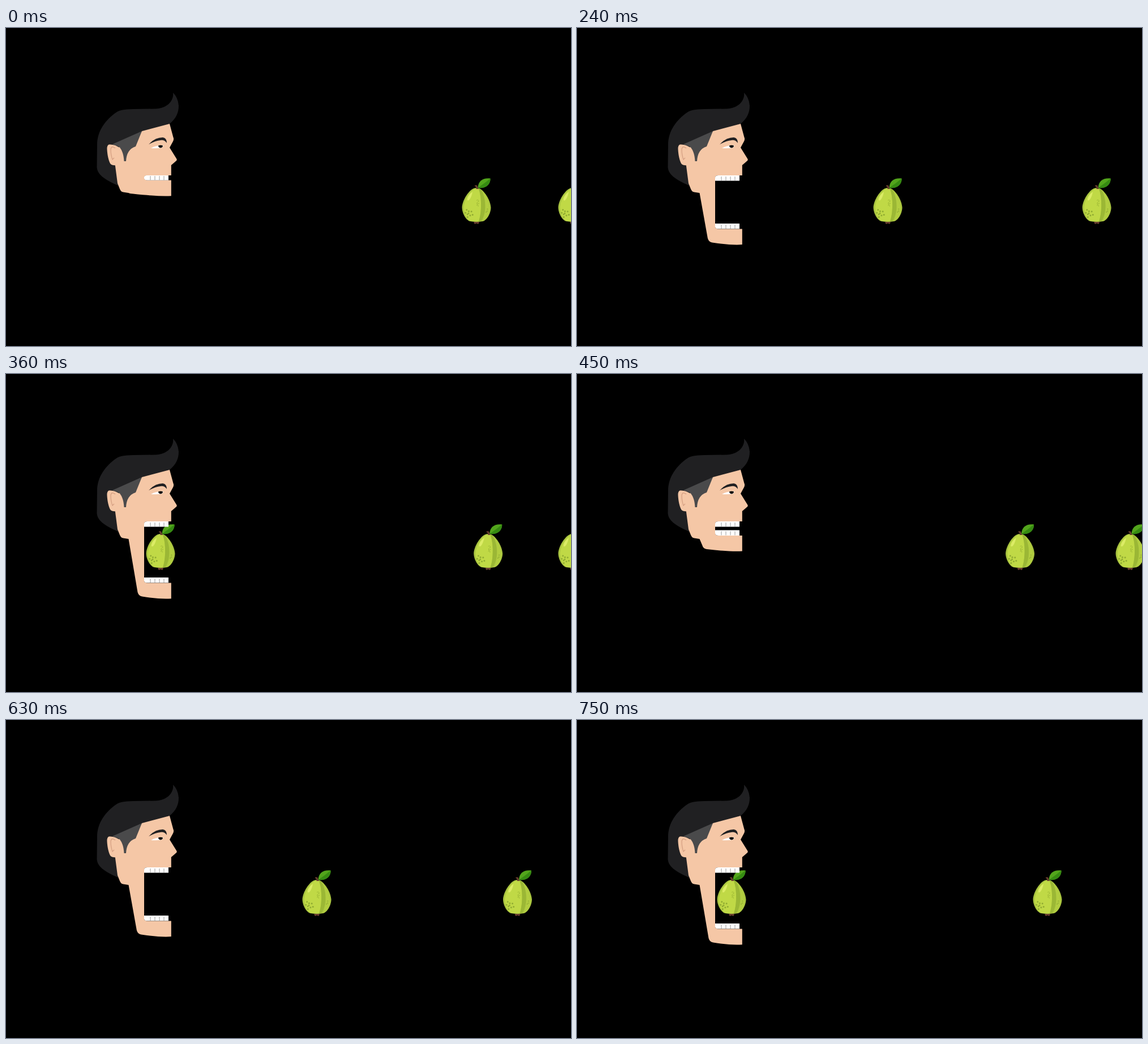
An HTML page for the animation above (0.78 s loop, 998 by 561 pixels).

```html
<!DOCTYPE html>
<html lang="en">
<head>
<meta charset="utf-8">
<title>Fruit eater</title>
<style>
  html, body { margin: 0; width: 100%; height: 100%; overflow: hidden; background: #000; }
  svg { display: block; width: 100vw; height: 100vh; }
</style>
</head>
<body>
<svg viewBox="0 0 998 561">
  <defs>
    <clipPath id="mouthClip"><path class="mouth"/></clipPath>
    <g id="fruit">
      <path fill="#6b4030" d="M-5 343L-3 346L0 344.5L3 346L5 343L3 341H-3Z"/>
      <path fill="#a9c440" d="M-5 283C-13 286 -25 303 -25.500 317C-25 329 -17 340 -11 341Q0 343 11 341C17 340 25 329 25.500 317C25 303 13 286 5 283Q0 281 -5 283Z"/>
      <path fill="#c0d946" d="M-4 284C-12 289 -22 303 -22.500 317C-22 329 -16 340 -9 341H4C9 328 10 300 4 284Q0 282 -4 284Z"/>
      <path fill="#9bb735" d="M4 284C10 300 9 328 4 341H8C18 327 18 300 7 284Z"/>
      <path fill="#b2cd40" d="M9 286C18 301 18 327 10 341C19 338 23 328 23 318C22 303 15 291 9 286Z"/>
      <path fill="#dcec66" d="M-7 289C-13 293 -17 300 -16 304C-13 306 -9 299 -7 289Z"/>
      <path fill="none" stroke="#9fb936" d="M0 304Q4 302 4 306Q0 307 1 311L5 309M0 313Q4 311 3 315"/>
      <g id="dots" fill="#91ac32"></g>
      <path fill="#6b4030" d="M-3 277.500L1 277.500Q2 281 4 284H-1Q1 281 -3 279Z"/>
      <path fill="#53a51c" d="M2.500 282C3 270 11 264 24.500 265.500C25 276 16 284 2.500 282Z"/>
      <path fill="#368b12" d="M2.500 282Q13 275 24.500 265.500C25 276 16 284 2.500 282Z"/>
    </g>
    <g id="teeth">
      <path fill="#fff" d="M244 0H287V9.500H244Z"/>
      <path stroke="#999" d="M255 2V9M263 2V9M271 2V9M279 2V9"/>
    </g>
  </defs>
  <rect width="998" height="561"/>

  <path fill="#202022" d="M295 114C297 128 285 142 264 142.500L226 143C208 143.500 201 145 196 148C174 163 162 182 161 204L160.500 246C162 258 171 266 198 278L240 200L289 169C301 159 305 149 305 137Q304 123 295 114Z"/>
  <path id="skin" fill="#f5c7a6"/>
  <path fill="#4a4a4b" d="M188 205L240 182L229 209Q213 214 212 235H208.500C208 222 204 213 199 209Z"/>
  <path fill="#f5c7a6" d="M202 212C195 207 189 205 182 205.500Q178 207 178.500 214C179 224 181 233 184 239Q187 243 195 242Z"/>
  <path fill="none" stroke="#d6a184" stroke-width="1.300" d="M193 212Q186 207 185 214Q185 224 188 232L191 229"/>
  <path fill="#202022" d="M252 205.500Q263 193 277 193Q284 194 284 203Q280 197 273 198Q263 199 252 205.500Z"/>
  <path fill="#fff" d="M256 212Q266 206.500 278 207L276 211Q267 213 256 212Z"/>
  <path d="M269 207.500Q273 206 277 207.500Q277 211 273 211.500Q269 211 269 207.500Z"/>

  <path class="mouth"/>
  <g id="fruits"></g>
  <g clip-path="url(#mouthClip)">
    <use href="#teeth" y="260"/>
    <use href="#teeth" id="lowerTeeth"/>
  </g>
</svg>
<script>
const STEP = 30, BITE = 13, LIFE = 2 * BITE - 1;
const launches = [-BITE, 0, BITE - 1];

const $ = id => document.getElementById(id);
const mouths = document.querySelectorAll('.mouth');

// The jaw opens fast, peaks and starts to fall back before it snaps shut.
const jawDrop = n => n * (5.7 + 1.45 * n - 0.1025 * n ** 2);
// The fruit speeds up all the way to the mouth.
const travel = n => n * (6.16 + 0.7025 * n - 0.03668 * n ** 2 + 0.0018125 * n ** 3);

// Speckles in a sunflower spiral.
const speckles = (count, cx, cy, spread, r) => Array.from({ length: count }, (_, i) => {
  const radius = spread * Math.sqrt(i), angle = i * 2.4;
  return `<circle cx="${cx + radius * Math.cos(angle)}" cy="${cy + radius * Math.sin(angle)}" r="${r}"/>`;
}).join('');

$('dots').innerHTML = speckles(9, -14, 327, 2.7, 1.5) + speckles(3, 19, 323, 2.5, 1);
$('fruits').innerHTML = launches.map(() => '<use href="#fruit"/>').join('');
const fruits = [...$('fruits').children];

function drawJaw(d) {
  const x = 216.5 + 16 * (d / 100) ** 0.7;
  $('skin').setAttribute('d', `M240 182L289 169L295.500 193Q297 196 295 200L289 211L300.500 229.500
    Q303 232.500 300.500 234.500L291.800 242V${296.2 + d}Q270 ${297.5 + d} ${x + 8} ${292.5 + d}
    Q${x + 2} ${292 + d} ${x} ${Math.max(291, 285 + d)}L216.500 291L207 289.500
    Q203 289 201 284L197 274L192 236L200 209L229 200Z`);
  const bottom = 268.5 + d;
  for (const mouth of mouths) {
    mouth.setAttribute('d', `M293 260H250Q244 260 244 264V${bottom - 4}Q244 ${bottom} 250 ${bottom}H293Z`);
  }
  $('lowerTeeth').setAttribute('y', 259 + d);
}

function draw(time) {
  const step = Math.floor(time / STEP) % (2 * BITE);
  drawJaw(jawDrop(step % BITE));
  fruits.forEach((fruit, i) => {
    const age = step - launches[i];
    fruit.setAttribute('x', 1001 - travel(age));
    fruit.style.display = age >= 0 && age <= LIFE ? '' : 'none';
  });
}

const start = performance.now();
function tick() {
  draw(performance.now() - start);
  requestAnimationFrame(tick);
}
tick();
</script>
</body>
</html>
```
